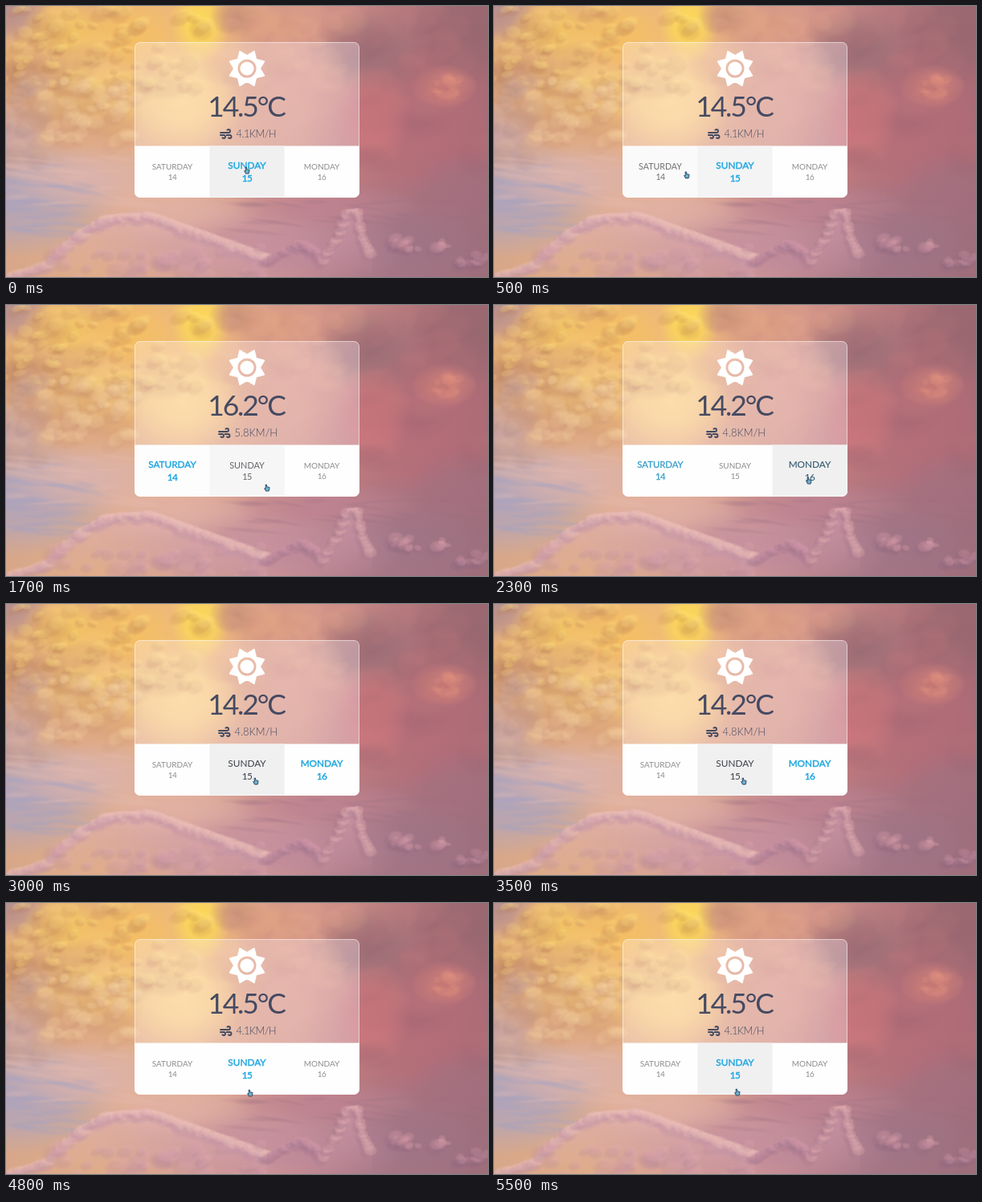
Animation of 600 by 338 pixels, one loop 5600 ms. Source, as an HTML page with a canvas:

```html
<!DOCTYPE html>
<html lang="en">
<head>
<meta charset="utf-8">
<title>Weather card</title>
<style>
  html, body { margin: 0; width: 100%; height: 100%; overflow: hidden; background: #c68c90; }
  canvas { display: block; width: 100%; height: 100%; }
</style>
</head>
<body>
<canvas id="stage"></canvas>
<script>
const W = 600, H = 338, LOOP = 5600, STEP = 100;
const FONT = 'Lato, "Open Sans", sans-serif';
const stage = document.getElementById('stage');
const ctx = stage.getContext('2d');
const scale = window.devicePixelRatio || 1;
stage.width = W * scale;
stage.height = H * scale;

const clamp = v => Math.min(1, Math.max(0, v));
const smooth = v => { v = clamp(v); return v * v * (3 - 2 * v); };
const mix = (a, b, k) => a + (b - a) * k;
const blend = (a, b, k) => a.map((v, i) => mix(v, b[i], k));
const rgb = (c, a = 1) => `rgba(${c.map(Math.round)},${a})`;
const hex = s => [0, 2, 4].map(i => parseInt(s.slice(i, i + 2), 16));

// ---------- sky ----------
let seed = 41;
const rand = () => {
  seed = (seed * 1664525 + 1013904223) >>> 0;
  return seed / 4294967296;
};
const between = (a, b) => mix(a, b, rand());

// A soft ellipse; core is how far it stays near full strength.
function blob(g, x, y, rx, ry, color, alpha, turn = 0, core = 0.45) {
  const c = hex(color);
  g.save();
  g.translate(x, y);
  g.rotate(turn);
  g.scale(rx, ry);
  const grad = g.createRadialGradient(0, 0, 0, 0, 0, 1);
  grad.addColorStop(0, rgb(c, alpha));
  grad.addColorStop(core, rgb(c, alpha * 0.75));
  grad.addColorStop(1, rgb(c, 0));
  g.fillStyle = grad;
  g.fillRect(-1, -1, 2, 2);
  g.restore();
}

// x, y, radius x, radius y, colour
const TONES = [
  [60, 60, 190, 140, 'dfa67a'], [200, 60, 140, 130, 'f4c070'],
  [380, 80, 130, 120, 'dc9c8c'], [520, 150, 150, 130, 'b56c78'],
  [490, 300, 170, 90, '9c7488'], [300, 300, 200, 80, 'c490a2'],
  [10, 240, 140, 75, 'aba4c2'], [110, 215, 120, 45, 'dcb4ae'],
  [210, 255, 110, 35, 'e2b2a6'], [0, 0, 55, 50, 'b08c90'],
  [75, 30, 55, 42, 'f6c95e'], [150, 35, 60, 45, 'f6c060'],
  [242, 22, 38, 48, 'ffe050'], [288, 14, 36, 26, 'c68f78'],
  [20, 90, 60, 40, 'cf9a74'], [110, 110, 80, 50, 'f6cc86'],
  [220, 120, 75, 65, 'fdd68a'], [335, 25, 50, 25, 'dfa080'],
  [0, 165, 70, 45, 'c8a4a6'], [450, 55, 75, 55, '946a74'],
  [580, 30, 80, 70, '97666f'], [545, 100, 42, 28, 'e48c7c'],
  [455, 140, 50, 65, 'cf767c'], [400, 250, 120, 30, 'bd8290'],
  [575, 230, 80, 50, 'a27080']
];

// Each bank scatters lit puffs, shaded towards the lower left.
function puff(g, x, y, r, squash, lit, shade, alpha, turn) {
  blob(g, x - r * 0.35, y + r * 0.45, r, r * squash, shade, alpha * 0.8, turn, 0.65);
  blob(g, x, y, r * 0.85, r * squash * 0.8, lit, alpha, turn, 0.65);
}

function bank(g, n, x0, y0, x1, y1, r0, r1, lit, shade, alpha) {
  for (let i = 0; i < n; i++)
    puff(g, between(x0, x1), between(y0, y1), between(r0, r1), between(0.5, 0.9), lit, shade, alpha, between(-0.6, 0.3));
}

function streaks(g, n, x0, y0, x1, y1, color, alpha) {
  for (let i = 0; i < n; i++)
    blob(g, between(x0, x1), between(y0, y1), between(18, 55), between(2, 5), color, alpha, between(-0.1, 0.2));
}

// A cloud body below a line of points, with billows along its top.
function ridge(g, points, fill, lit, shade, r0, r1) {
  const body = g.createLinearGradient(0, Math.min(...points.map(p => p[1])), 0, H);
  body.addColorStop(0, rgb(hex(fill), 0.75));
  body.addColorStop(1, rgb(hex(fill), 0));
  g.fillStyle = body;
  g.beginPath();
  points.forEach(p => g.lineTo(...p));
  g.lineTo(points[points.length - 1][0], H);
  g.lineTo(points[0][0], H);
  g.fill();
  for (let i = 1; i < points.length; i++) {
    const [a, b] = [points[i - 1], points[i]];
    const n = Math.ceil(Math.hypot(b[0] - a[0], b[1] - a[1]) / 6);
    for (let j = 0; j < n; j++) {
      const r = between(r0, r1);
      puff(g, mix(a[0], b[0], j / n), mix(a[1], b[1], j / n) + r * 0.5, r, between(0.6, 0.9), lit, shade, 0.4, 0);
    }
  }
}

function makeSky() {
  const sky = document.createElement('canvas');
  sky.width = W;
  sky.height = H;
  const g = sky.getContext('2d');
  const base = g.createLinearGradient(0, 0, W, 40);
  base.addColorStop(0, '#d6a68a');
  base.addColorStop(0.4, '#e6b088');
  base.addColorStop(0.7, '#c48484');
  base.addColorStop(1, '#a06a74');
  g.fillStyle = base;
  g.fillRect(0, 0, W, H);
  for (const [x, y, rx, ry, c] of TONES) blob(g, x, y, rx, ry, c, 0.85);

  bank(g, 14, 0, 10, 240, 120, 26, 42, 'fbd07a', 'bf845c', 0.28);
  bank(g, 70, -10, 0, 250, 100, 6, 18, 'ffde80', 'b87a52', 0.3);
  bank(g, 50, 40, 90, 165, 170, 6, 18, 'fcdca6', 'cf9878', 0.28);
  bank(g, 22, -10, 90, 50, 190, 8, 22, 'dcb49c', 'ac8888', 0.26);
  bank(g, 22, 280, 0, 430, 90, 12, 34, 'f0b690', 'c08078', 0.18);
  bank(g, 20, 440, 10, 610, 190, 18, 44, 'c47a7c', '8c5c6a', 0.16);
  streaks(g, 22, -10, 195, 100, 285, '9a9fc6', 0.26);
  streaks(g, 16, -10, 185, 170, 250, 'e6bcb0', 0.3);
  streaks(g, 18, 300, 240, 610, 285, '966c82', 0.22);

  ridge(g, [[0, 334], [50, 318], [88, 282], [125, 260], [180, 256], [260, 285], [330, 310]], 'dfb0b0', 'f0c4ba', 'c090a4', 7, 14);
  bank(g, 34, 60, 298, 320, 345, 7, 18, 'e2a8b0', 'ae8098', 0.28);
  ridge(g, [[325, 312], [370, 290], [395, 308]], 'b98498', 'd89cac', '9c7088', 6, 11);
  ridge(g, [[395, 312], [414, 282], [424, 254], [438, 252], [444, 284], [456, 308]], 'cf9aa8', 'eab4b4', 'a6788c', 6, 11);
  bank(g, 18, 475, 290, 550, 304, 5, 13, 'd89ca8', '94687e', 0.4);
  bank(g, 10, 565, 310, 600, 322, 5, 11, 'c890a0', '8c647c', 0.4);
  bank(g, 14, 530, 90, 565, 112, 5, 14, 'ec9a80', 'bc7072', 0.22);
  return sky;
}
const sky = makeSky();

// ---------- timeline ----------
const DAYS = [
  { name: 'SATURDAY', date: '14', x: 207, hover: [[380, 1460]], active: [[850, 2200]] },
  { name: 'SUNDAY', date: '15', x: 300, hover: [[-900, 380], [1550, 1830], [2650, 4320], [4790, 9000]], active: [[-300, 850], [3700, 9000]] },
  { name: 'MONDAY', date: '16', x: 393, hover: [[1830, 2650]], active: [[2200, 3700]] }
];
const READINGS = [
  { temp: '16.2°C', wind: '5.8KM/H', x: 264, tight: 0 },
  { temp: '14.5°C', wind: '4.1KM/H', x: 266, tight: -0.6 },
  { temp: '14.2°C', wind: '4.8KM/H', x: 264, tight: 0 }
];
// time, x, y of the pointer
const PATH = [
  [0, 300, 205], [150, 298, 206], [650, 224, 212], [1250, 224, 212],
  [1700, 325, 228], [2050, 392, 219], [2400, 392, 219], [2850, 311, 221],
  [4150, 311, 221], [4500, 306, 249], [4800, 304, 237], [5500, 303, 236]
];

const level = (spans, t, d = 300) => Math.max(...spans.map(([a, b]) =>
  smooth((t - a) / d) * (1 - smooth((t - b) / d))));

function pointerAt(t) {
  const i = PATH.findIndex(p => p[0] > t);
  if (i < 0) return PATH[PATH.length - 1].slice(1);
  const [a, b] = [PATH[i - 1], PATH[i]];
  const k = smooth((t - a[0]) / (b[0] - a[0]));
  return [mix(a[1], b[1], k), mix(a[2], b[2], k)];
}

// ---------- card ----------
function text(s, x, y, size, color, { align = 'center', spacing = 0, bold = 0, weight = 400 } = {}) {
  ctx.font = `${weight} ${size}px ${FONT}`;
  ctx.letterSpacing = spacing + 'px';
  ctx.textAlign = align;
  ctx.fillStyle = ctx.strokeStyle = color;
  ctx.fillText(s, x, y);
  if (bold > 0.02) {
    ctx.lineWidth = bold;
    ctx.strokeText(s, x, y);
  }
}

function sun(x, y) {
  const star = new Path2D(), hole = new Path2D(), core = new Path2D();
  for (let i = 0; i < 16; i++) {
    const r = i % 2 ? 16 : 23, a = (i + 1) * Math.PI / 8;
    star.lineTo(r * Math.cos(a), r * Math.sin(a));
  }
  star.closePath();
  hole.arc(0, 0, 11.5, 0, Math.PI * 2);
  core.arc(0, 0, 8.6, 0, Math.PI * 2);
  const rays = new Path2D(star);
  rays.addPath(hole);
  ctx.save();
  ctx.translate(x, y);
  ctx.fillStyle = ctx.strokeStyle = '#fff';
  ctx.lineJoin = 'round';
  ctx.lineWidth = 1.8;
  ctx.fill(rays, 'evenodd');
  ctx.stroke(star);
  ctx.fill(core);
  ctx.restore();
}

function wind(x, y) {
  ctx.save();
  ctx.translate(x, y);
  ctx.strokeStyle = '#434a60';
  ctx.lineWidth = 1.9;
  ctx.beginPath();
  ctx.moveTo(0.3, 6);
  ctx.lineTo(11, 6);
  ctx.arc(11, 4, 2, Math.PI / 2, -Math.PI * 0.9, true);
  ctx.moveTo(0.3, 9);
  ctx.lineTo(5, 9);
  ctx.arc(5, 11, 2, -Math.PI / 2, Math.PI * 0.9);
  ctx.moveTo(8, 9);
  ctx.lineTo(12.5, 9);
  ctx.arc(12.5, 11, 2, -Math.PI / 2, Math.PI * 0.9);
  ctx.stroke();
  ctx.restore();
}

function hand(x, y) {
  ctx.save();
  ctx.translate(x, y);
  ctx.scale(0.85, 0.9);
  ctx.beginPath();
  ctx.moveTo(-2.2, -4.2);
  ctx.lineTo(-0.6, -4.2);
  ctx.lineTo(-0.2, -1.3);
  ctx.lineTo(3.4, -0.6);
  ctx.lineTo(3.2, 2.6);
  ctx.lineTo(2.2, 4.4);
  ctx.lineTo(-1.6, 4.4);
  ctx.lineTo(-3.8, 0.8);
  ctx.lineTo(-2, 0.6);
  ctx.closePath();
  ctx.fillStyle = '#6fb2d0';
  ctx.strokeStyle = '#33506a';
  ctx.lineJoin = 'round';
  ctx.lineWidth = 1.2;
  ctx.fill();
  ctx.stroke();
  ctx.restore();
}

const GREY = hex('8c8c8c'), DARK = hex('3c3f48'), BLUE = hex('22a8e0');

function drawDay(day, i, t) {
  const h = level(day.hover, t), a = level(day.active, t), k = Math.max(h, a);
  if (h > 0) {
    ctx.fillStyle = rgb(hex('f0f0f1'), h);
    ctx.fillRect(160 + i * 93.33, 174.5, 93.33, 65);
  }
  const color = rgb(blend(blend(GREY, DARK, h), BLUE, a));
  const size = mix(10, 11.8, k), bold = a * 0.45;
  text(day.name, day.x, 203.7 - 0.4 * k, size, color, { bold });
  text(day.date, day.x, 216.7 + 1.9 * k, size, color, { bold, spacing: -0.6 });
}

function draw(t) {
  ctx.setTransform(scale, 0, 0, scale, 0, 0);
  ctx.drawImage(sky, 0, 0, W, H);

  ctx.save();
  ctx.beginPath();
  ctx.roundRect(160, 45, 280, 194, 7);
  ctx.clip();
  ctx.fillStyle = 'rgba(255,246,250,0.3)';
  ctx.fillRect(160, 45, 280, 130);
  ctx.fillStyle = '#fefefe';
  ctx.fillRect(160, 174.5, 280, 65);
  DAYS.forEach((day, i) => drawDay(day, i, t));
  ctx.restore();

  ctx.beginPath();
  ctx.roundRect(160.5, 45.5, 279, 193, 6.5);
  ctx.strokeStyle = 'rgba(255,255,255,0.5)';
  ctx.lineWidth = 1;
  ctx.stroke();

  const shown = READINGS[DAYS.findIndex(d => d.active.some(([a, b]) => t >= a && t < b))];
  sun(300, 78);
  text(shown.temp, 299, 138.3, 35.5, '#454a62', { spacing: -2.2 });
  wind(shown.x, 152);
  text(shown.wind, shown.x + 20.5, 164, 13, '#454a62', { align: 'left', spacing: shown.tight, weight: 300 });
  hand(...pointerAt(t));
}

const start = performance.now();
function tick() {
  const t = (performance.now() - start) % LOOP;
  draw(Math.floor(t / STEP) * STEP);
  requestAnimationFrame(tick);
}
tick();
</script>
</body>
</html>
```
